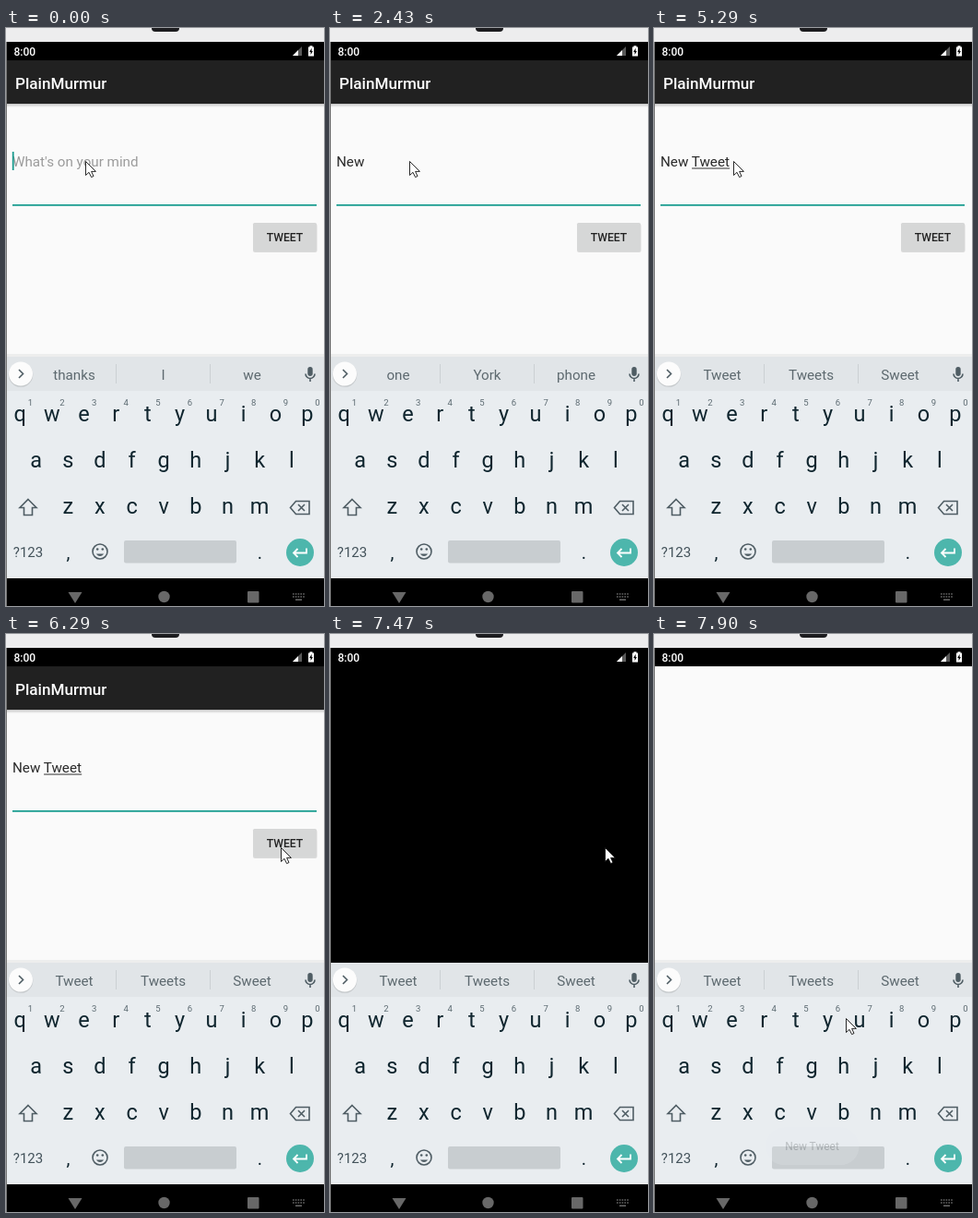
Write an HTML page that moves like this. It is 345 px wide and 626 px high and loops after 8000 ms.

```html
<!DOCTYPE html>
<html lang="en">
<head>
<meta charset="utf-8">
<title>Compose screen</title>
<style>
  html, body { margin: 0; width: 100%; height: 100%; overflow: hidden; background: #ededee; }
  svg { display: block; width: 345px; height: 626px; font-family: Roboto, sans-serif; }
  text { white-space: pre; }
  .mid { text-anchor: middle; }
  .field { font-size: 15.2px; }
  .icon { fill: none; stroke: #4f5d64; stroke-width: 1.6; }
</style>
</head>
<body>
<svg id="stage" viewBox="0 0 345 626">
  <defs>
    <linearGradient id="shade" x2="0" y2="1">
      <stop stop-color="#000" stop-opacity=".22"/><stop offset="1" stop-color="#000" stop-opacity="0"/>
    </linearGradient>
  </defs>
  <rect width="345" height="626" fill="#ededee"/>
  <rect x="158" y="-8" width="30" height="12" rx="4" fill="#1c1c1f"/>
  <rect y="15" width="345" height="611" fill="#000"/>

  <g fill="#fff">
    <text x="8.5" y="29.5" font-size="12" font-weight="500">8:00</text>
    <path d="M311 30L321 20V30Z" opacity=".35"/>
    <path d="M311 30L317 24V30Z"/>
    <path d="M328 20.5H329.5V19.2H332.5V20.5H334V30.5H328Z"/>
    <path d="M331.6 21.8L329.2 26H330.6V29L332.9 25H331.6Z" fill="#000"/>
  </g>

  <rect id="page" x="1" y="35" width="344" height="321" fill="#fafafa"/>
  <g id="compose">
    <rect x="1" y="82" width="344" height="4" fill="url(#shade)"/>
    <rect x="1" y="35" width="344" height="47" fill="#212121"/>
    <text x="10" y="65.5" font-size="17.1" font-weight="500" fill="#fff">PlainMurmur</text>
    <text id="hint" class="field" x="7" y="150" fill="#9b9b9b">What's on your mind</text>
    <text id="typed" class="field" x="7" y="150" fill="#2a2a2a"></text>
    <rect id="composing" y="151.5" height="1" fill="#333"/>
    <rect id="caret" y="134" width="1.8" height="20" fill="#1a9b8e"/>
    <rect x="7" y="191" width="330" height="1.7" fill="#139a8d"/>
    <rect x="268" y="212" width="69.5" height="31" rx="2" fill="#000" opacity=".13"/>
    <rect id="button" x="268" y="211" width="69" height="30.5" rx="1.5"/>
    <text class="mid" x="302.5" y="231" font-size="12.2" font-weight="500" fill="#222">TWEET</text>
  </g>
  <rect id="edge" x="1" y="353" width="344" height="3" fill="#000" opacity=".05"/>

  <rect x="1" y="356" width="344" height="240" fill="#e9edf0"/>
  <rect x="1" y="356" width="344" height="37" fill="#e1e5e8"/>
  <path d="M119.5 364V385M221.5 364V385" stroke="#cbd0d3"/>
  <circle cx="16" cy="375.5" r="13.3" fill="#000" opacity=".12"/>
  <circle cx="16" cy="374.5" r="13" fill="#fcfcfc"/>
  <path d="M14 370L18.5 374.5L14 379" class="icon"/>
  <g id="words"></g>
  <rect x="327.3" y="367" width="5.4" height="10" rx="2.7" fill="#4f5d64"/>
  <path d="M325 374.5A5 5 0 0 0 335 374.5M330 379.5V383" class="icon" stroke-width="1.4"/>

  <g id="keys"></g>
  <path id="shift" d="M24 510.5L33 519.5H28.5V527.5H19.5V519.5H15Z" class="icon"/>
  <path d="M314.5 512.5H329V526.5H314.5L308.5 519.5ZM317 516L324 523M324 516L317 523" class="icon"/>
  <text class="mid" x="24" y="573" font-size="15" fill="#43525a">?123</text>
  <circle cx="102" cy="567" r="8" class="icon"/>
  <path d="M97.8 569.5Q102 574.5 106.2 569.5Z" fill="#4f5d64"/>
  <circle cx="99.2" cy="564.5" r="1.3" fill="#4f5d64"/>
  <circle cx="104.8" cy="564.5" r="1.3" fill="#4f5d64"/>
  <rect x="128" y="555" width="122" height="24.5" rx="2" fill="#c8cdd0"/>
  <circle cx="319" cy="568" r="15" fill="#4db6ac"/>
  <path d="M326 563.5V568.5H312.5M316.5 564L312 568.5L316.5 573" fill="none" stroke="#fff" stroke-width="1.8"/>

  <g fill="#686868">
    <path d="M67.5 611H82.5L75 623Z"/>
    <circle cx="171.5" cy="616" r="6.2"/>
    <rect x="262" y="610" width="12.5" height="12.5" rx="1"/>
    <path d="M311 613H324M311 616H324" stroke="#686868" stroke-width="1.6" stroke-dasharray="1.6 1.2"/>
    <rect x="314" y="618.5" width="7" height="1.5"/>
  </g>
  <g id="toast">
    <rect x="121" y="534" width="101.5" height="41" rx="20" fill="#e9edf0" opacity=".8"/>
    <text class="mid" x="171.5" y="559" font-size="11.9" fill="#30373b">New Tweet</text>
  </g>
  <path d="M0.5 15V626" stroke="#777"/>
  <path id="pointer" d="M.5 .5V15.5L4 12.3L6.6 17.6L9 16.5L6.6 11.4H11.4Z" fill="#fff" stroke="#111" stroke-width=".9"/>
</svg>
<script>
const LOOP = 8000;
const $ = id => document.getElementById(id);
const set = (el, attrs) => { for (const k in attrs) el.setAttribute(k, attrs[k]); return el; };
const add = (parent, attrs, content = '') => {
  const el = set(document.createElementNS('http://www.w3.org/2000/svg', 'text'), attrs);
  el.textContent = content;
  return parent.appendChild(el);
};
const show = (el, on) => el.setAttribute('visibility', on ? 'visible' : 'hidden');
const latest = (list, t) => list.filter(item => item[0] <= t).pop();

// time, field text, suggestions; '*' marks the autocorrect choice
const typing = [
  [0, '', 'thanks I we'],
  [120, '', 'Thanks I We'],
  [240, 'N', 'Thanks I We'],
  [360, 'N', 'N No Not'],
  [1240, 'New', 'Ne New Next'],
  [1390, 'New', 'New News Newt'],
  [2040, 'New ', 'one York phone'],
  [2990, 'New T', 'T The Things'],
  [3290, 'New Tw', 'T The Things'],
  [3410, 'New Tw', 'Tw Two Twenty'],
  [3810, 'New Twe', 'Tw Two Twenty'],
  [3930, 'New Twee', 'Twe The Tweet'],
  [4050, 'New Twee', 'Twee *Tree Tweet'],
  [4640, 'New Tweet', 'Twee *Tree Tweet'],
  [4760, 'New Tweet', 'Tweet Tweets Sweet']
];
const caretOff = [[770, 1240], [1790, 2040], [2430, 2990], [5290, 5690], [6170, 6690], [7350, LOOP]];
const toastLevels = [[0, 0], [7350, .55], [7470, 0], [7750, .36], [7900, .25]];

const words = [74, 170.5, 267].map(x => add($('words'), { x, y: 380.7, class: 'mid', 'font-size': 15.2 }));
const letters = [];
[['qwertyuiop', 15.3, 426], ['asdfghjkl', 32.7, 476], ['zxcvbnm', 67.3, 526]].forEach(([row, x0, y]) => {
  [...row].forEach((ch, i) => {
    const x = x0 + i * 34.63;
    letters.push(add($('keys'), { x, y, class: 'mid', 'font-size': 23.5, fill: '#10262f' }, ch));
    if (y === 426) add($('keys'), { x: x + 11, y: 409, class: 'mid', 'font-size': 9.5, fill: '#5c6a71' }, (i + 1) % 10);
  });
});
add($('keys'), { x: 67.5, y: 575, class: 'mid', 'font-size': 20, fill: '#10262f' }, ',');
add($('keys'), { x: 275.5, y: 575, class: 'mid', 'font-size': 20, fill: '#10262f' }, '.');

const ruler = document.createElement('canvas').getContext('2d');
ruler.font = '15.2px Roboto, sans-serif';
const endOf = text => 7 + ruler.measureText(text).width;

function pointerAt(t) {
  if (t >= 7900) return [208, 416];
  const step = Math.max(0, Math.min(7, Math.floor((t - 5570) / 120) + 1)) / 7;
  const p = step * step * (3 - 2 * step);
  return [86 + 212 * p, 144 + 87 * p];
}

function draw(t) {
  const [, text, choices] = latest(typing, t);
  $('typed').textContent = text;
  show($('hint'), !text);
  const start = endOf(text.slice(0, text.lastIndexOf(' ') + 1)), end = endOf(text);
  set($('composing'), { x: start, width: Math.max(0, end - start) });
  $('caret').setAttribute('x', end - (text ? .4 : .2));
  show($('caret'), !caretOff.some(([a, b]) => t >= a && t < b));

  choices.split(' ').forEach((word, i) => {
    const bold = word[0] === '*';
    words[i].textContent = word.replace('*', '');
    set(words[i], { fill: bold ? '#000' : '#5d696f', 'font-weight': bold ? 700 : 400 });
  });
  const upper = t >= 120 && t < 240;
  letters.forEach(el => {
    el.textContent = upper ? el.textContent.toUpperCase() : el.textContent.toLowerCase();
  });
  $('shift').style.fill = upper ? '#4f5d64' : 'none';

  const black = t >= 7470 && t < 7750;
  $('page').setAttribute('fill', black ? '#000' : '#fafafa');
  $('compose').setAttribute('display', t < 7470 ? 'inline' : 'none');
  show($('edge'), !black);
  $('button').setAttribute('fill', t >= 6960 && t < 7080 ? '#c1c2c2' : '#d6d7d7');
  $('toast').setAttribute('opacity', latest(toastLevels, t)[1]);
  $('pointer').setAttribute('transform', `translate(${pointerAt(t).map(Math.round)})`);
}

const begin = performance.now();
function tick() {
  draw((performance.now() - begin) % LOOP);
  requestAnimationFrame(tick);
}
tick();
</script>
</body>
</html>
```
